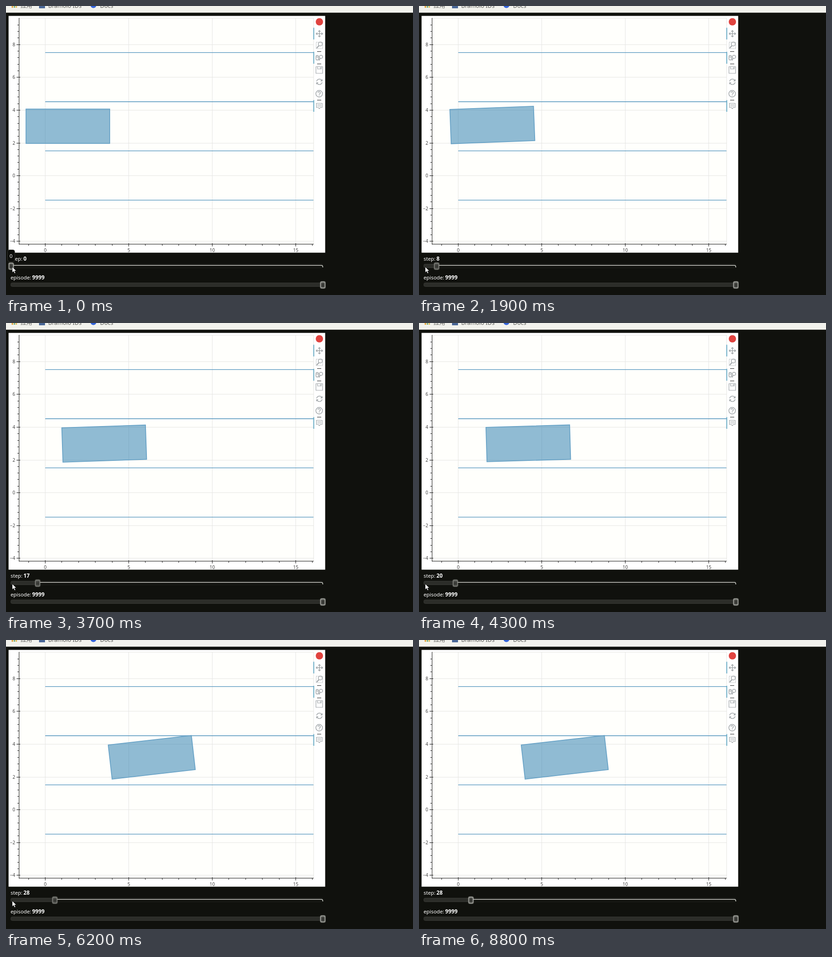
These frames come from a looping animation (887x631 px, 9 s). An HTML page:

```html
<!DOCTYPE html>
<html lang="en">
<head>
<meta charset="utf-8">
<title>Step viewer</title>
<style>
  html, body { margin: 0; width: 100%; height: 100%; overflow: hidden; background: #10110d; }
  svg { display: block; width: 887px; height: 631px; }
  text { font-family: "Noto Sans", "Noto Sans CJK SC", sans-serif; }
  .tick { font-size: 10px; fill: #444; }
  .ui { font-size: 11.3px; fill: #fff; }
  .bold { font-size: 11.8px; font-weight: 700; }
  .mark { font-size: 12.5px; fill: #5a5b58; }
  .icon { fill: none; stroke: #a1a6a9; stroke-width: 1.5; }
</style>
</head>
<body>
<svg viewBox="0 0 887 631">
  <rect width="887" height="14.6" fill="#f2f2ed"/>
  <circle cx="14" cy="2" r="2" fill="#e3a33c"/>
  <circle cx="18.5" cy="2" r="1.7" fill="#5fa463"/>
  <circle cx="22.5" cy="2" r="1.7" fill="#e0b23f"/>
  <rect x="72" y="-8" width="13" height="13" fill="#4a6797"/>
  <circle cx="190.5" cy="-2" r="6.5" fill="#3565dc"/>
  <text class="mark" x="32" y="3.5">应用</text>
  <text class="mark" x="92" y="3.5">Bramolo IDs</text>
  <text class="mark" x="205" y="3.5">Docs</text>

  <rect x="5.6" y="21.6" width="690" height="517" fill="#fff"/>
  <rect x="28.5" y="26.5" width="642" height="493.5" fill="#fffffc" stroke="#e5e5e3"/>
  <g id="plot"></g>
  <rect id="car" x="-91.2" y="-37.5" width="182.4" height="75"
        fill="#2278ac" fill-opacity=".5" stroke="#69a3c7" stroke-width="1.8"/>

  <circle cx="683" cy="34.5" r="8" fill="#e0433f"/>
  <path d="M670.7 47.500V73M670.7 100V126M670.7 205.500V231" stroke="#5ba3c0" stroke-width="1.800"/>
  <path d="M678 99.500h9M678 126.500h9M678 205.500h9" stroke="#222"/>
  <g class="icon">
    <path d="M676 60.500h14M683 53.500v14M680.500 56l2.500-2.500 2.500 2.500M680.500 65l2.500 2.500 2.500-2.500M678.500 58l-2.500 2.500 2.500 2.500M687.500 58l2.500 2.500-2.500 2.500"/>
    <rect x="676" y="79" width="14" height="14" stroke-width="1" stroke-dasharray="2 1.5"/>
    <circle cx="685" cy="83" r="4.3" fill="#fff"/>
    <path d="M682 86.500l-5 5.500" stroke-width="2.2"/>
    <rect x="675.5" y="108" width="5.5" height="10" rx="2.7"/>
    <path d="M678.200 110v3"/>
    <circle cx="686.5" cy="111" r="3.6"/>
    <path d="M684.500 114l-2.500 5" stroke-width="2"/>
    <path d="M675.500 132.500h14.500v14.500h-14.500zM679 133v4.500h8v-4.500M685 134v2.500" stroke-width="1.2"/>
    <path d="M677 164.500a6.200 6.200 0 0 1 11-2.500M689 166.500a6.200 6.200 0 0 1-11 2.500"/>
    <path d="M689.500 160v4h-4zM676.500 171v-4h4z" fill="#a1a6a9" stroke-width=".6"/>
    <circle cx="682.5" cy="191.5" r="7.2"/>
    <path d="M680 189.500a2.500 2.500 0 1 1 3.700 2.200q-1.200 .6-1.200 2M682.500 195v1.600"/>
    <path d="M676.500 212.500h12.500v9h-4l-2.200 2.700-2.300-2.700h-4zM678.500 215.500h8.500M678.500 218.500h8.500" stroke-width="1.2"/>
  </g>

  <defs>
    <linearGradient id="knob" x2="0" y2="1">
      <stop offset="0" stop-color="#5c5d59"/>
      <stop offset=".5" stop-color="#343531"/>
      <stop offset="1" stop-color="#4e4f4b"/>
    </linearGradient>
    <g id="grip">
      <rect x="-6" y="-8" width="12" height="16" rx="3" fill="#8a8b86" opacity=".4"/>
      <rect x="-4.500" y="-6.500" width="9" height="13" rx="2" fill="url(#knob)" stroke-width="1.300"/>
    </g>
  </defs>
  <text class="ui" x="10" y="555.5">step:</text>
  <text class="ui bold" id="value" x="38" y="555.5">0</text>
  <rect x="10.5" y="563.5" width="680" height="8" rx="3" fill="#0c0d09" stroke="#252622"/>
  <path d="M12 566.300H687.500q3 0 3 4.500" fill="none" stroke="#bfc0ba" stroke-width="1.7"/>
  <rect id="fill" x="10.5" y="563.5" height="8" rx="3" fill="#2c2d29" stroke="#383935"/>
  <use id="handle" href="#grip" y="568"/>
  <g id="tip">
    <rect x="3.5" y="532.5" width="15.5" height="25.5" rx="4" fill="#0c0d0a" stroke="#30312d"/>
    <text class="ui" x="11" y="549.5" text-anchor="middle">0</text>
  </g>

  <text class="ui" x="10" y="596.5">episode:</text>
  <text class="ui bold" x="57" y="596.5">9999</text>
  <rect x="10.5" y="604.5" width="680" height="8" rx="3" fill="#2c2d29" stroke="#383935"/>
  <use href="#grip" x="690.5" y="609" stroke="#b5b6b0"/>
  <path id="cursor" d="M.5 .5V13l3-2.700 2 4.700 2.200-1-2-4.500h4z" fill="#fff" stroke="#111" stroke-width=".8"/>
</svg>
<script>
const LOOP = 9000, LAST_STEP = 28, LAST_HANDLE = 30;
const $ = id => document.getElementById(id);
const px = v => 85.5 + 36.4 * v;
const py = v => 370.6 - 35.8 * v;
const clamp = (v, lo, hi) => Math.min(hi, Math.max(lo, v));
const mix = (a, b, p) => a + (b - a) * p;

function add(tag, attrs, text) {
  const el = document.createElementNS("http://www.w3.org/2000/svg", tag);
  for (const key in attrs) el.setAttribute(key, attrs[key]);
  if (text !== undefined) el.textContent = text;
  $("plot").append(el);
}
const line = (x1, y1, x2, y2, stroke, width = 1) =>
  add("line", { x1, y1, x2, y2, stroke, "stroke-width": width });
const snap = v => Math.floor(v) + 0.5;

function drawPlot() {
  const grid = "#e5e5e3", ink = "#111";
  for (let v = 0; v <= 15; v += 5) line(px(v), 27, px(v), 520, grid);
  for (let v = -4; v <= 8; v += 2) line(29, snap(py(v)), 670, snap(py(v)), grid);
  for (let v = -1.5; v <= 7.5; v += 3)
    line(px(0), py(v) - 0.5, 670, py(v) - 0.5, "#4a8fbb", 1.3);

  line(28.5, 26, 28.5, 520.5, ink);
  line(28, 520, 670.5, 520, ink);
  for (let i = -10; i <= 23; i++) {
    const y = snap(py(i * 0.4)), major = i % 5 === 0;
    line(major ? 23 : 25, y, major ? 31 : 28, y, ink);
    if (major) add("text", { class: "tick", x: 20, y: y + 3.6, "text-anchor": "end" },
      String(i * 0.4).replace("-", "−"));
  }
  for (let v = -1; v <= 16; v++) {
    const x = snap(px(v)), major = v % 5 === 0;
    line(x, major ? 518 : 520, x, major ? 525 : 523.5, ink);
    if (major) add("text", { class: "tick", x, y: 537, "text-anchor": "middle" }, v);
  }
}

// the car swings between these headings: step, degrees
const swings = [[0, 0], [5, -6], [13, 6.3], [18, -2.8], [23.3, 0.8], [27, -6.5], [30, -6.5]];

function heading(step) {
  const i = swings.findIndex(([s]) => s > step);
  const [s0, a0] = swings[i - 1], [s1, a1] = swings[i];
  return mix(a0, a1, (1 - Math.cos(Math.PI * (step - s0) / (s1 - s0))) / 2);
}

// steadily accelerating drive along the heading, steered about the rear axle
function carPose(step) {
  const slope = n => Math.sin(heading(n) * Math.PI / 180);
  const travel = n => 1.77 * n + 0.17 * n * n;
  let y = 262.5 + 40 * slope(step);
  for (let n = 1; n <= step; n++) y += (travel(n) - travel(n - 1)) * slope(n) + 0.07;
  return { x: 134.8 + travel(step), y, angle: heading(step) };
}

// key repeat that slows down a little
function stepAt(t) {
  const s = Math.max(0, t / 1000 - 0.45);
  return Math.min(LAST_HANDLE, Math.floor(0.12 + 5.95 * s - 0.19 * s * s));
}

function pointerAt(t) {
  const up = clamp((t - 7400) / 400, 0, 1), away = clamp((t - 8000) / 800, 0, 1);
  return [mix(mix(13, 90, up), 13, away), mix(mix(569, 146, up), -40, away)];
}

function render(time) {
  const t = Math.floor(time / 100) * 100;
  const count = t < 6800 ? stepAt(t) : LAST_HANDLE;
  const step = Math.min(LAST_STEP, count);
  const { x, y, angle } = carPose(step);
  $("car").setAttribute("transform", `translate(${x} ${y}) rotate(${angle})`);
  $("value").textContent = step;

  const pos = 11.2 + 3.4 * count;
  const focused = t >= 600 && t < 8100;
  $("handle").setAttribute("x", pos);
  $("handle").setAttribute("stroke", focused ? "#858680" : "#b5b6b0");
  $("fill").setAttribute("width", pos - 10.5);
  $("tip").setAttribute("visibility", t < 600 ? "visible" : "hidden");
  $("cursor").setAttribute("transform", `translate(${pointerAt(t)})`);
}

drawPlot();
const start = performance.now();
function tick() {
  render((performance.now() - start) % LOOP);
  requestAnimationFrame(tick);
}
tick();
</script>
</body>
</html>
```
